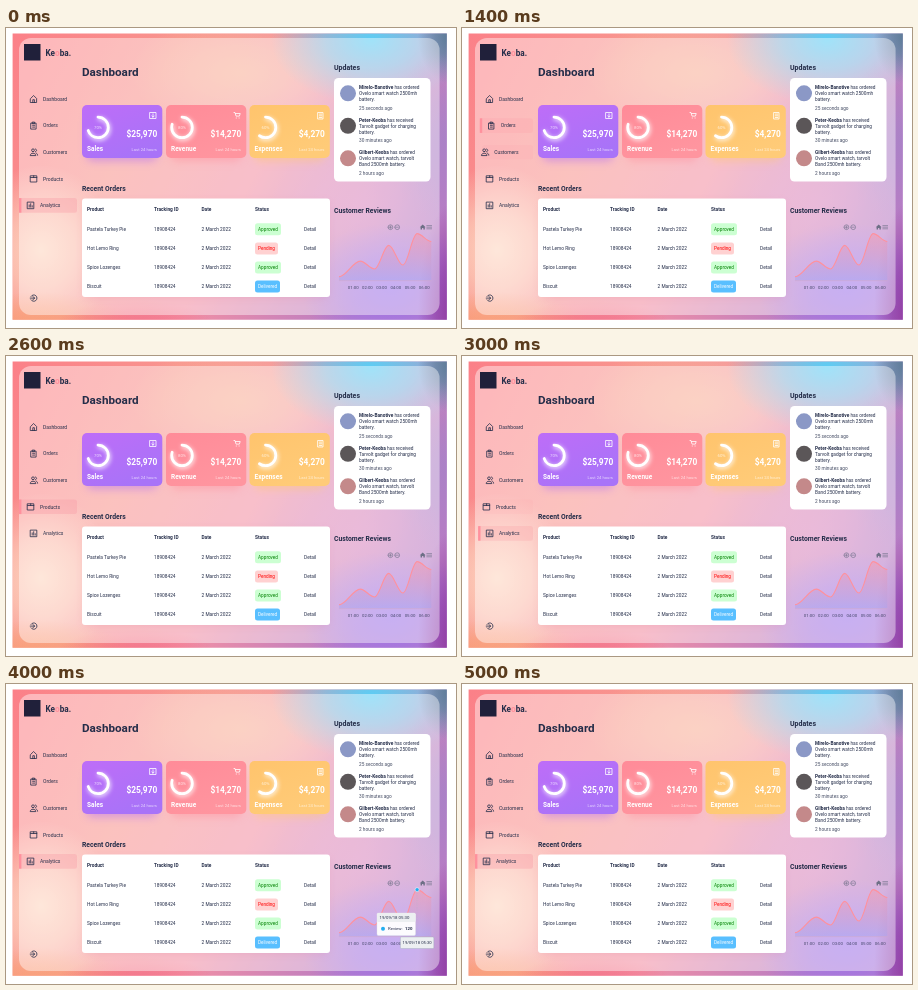
Recreate the animation shown at these times as an HTML page. Size 450x300 px, loop 5.1 s.

```html
<!DOCTYPE html>
<html lang="en">
<head>
<meta charset="utf-8">
<title>Dashboard</title>
<style>
html, body { margin: 0; width: 100%; height: 100%; overflow: hidden; background: #fff; }
svg { display: block; width: 450px; height: 300px; font-family: Roboto, sans-serif; }
text { fill: #242d49; white-space: pre; }
.b { font-weight: 700; }
.icon { fill: none; stroke: #242d49; stroke-width: .8; stroke-linecap: round; stroke-linejoin: round; }
</style>
</head>
<body>
<svg id="stage" viewBox="0 0 450 300">
  <defs>
    <clipPath id="wall"><rect x="6.6" y="5.5" width="434.2" height="286.2"/></clipPath>
    <linearGradient id="base" x2="1" y2=".35">
      <stop offset="0" stop-color="#fb8088"/><stop offset=".35" stop-color="#f8958f"/>
      <stop offset=".65" stop-color="#f290a4"/><stop offset="1" stop-color="#b87cc4"/>
    </linearGradient>
    <linearGradient id="purple" x2=".6" y2="1"><stop stop-color="#be6df8"/><stop offset="1" stop-color="#a873f8"/></linearGradient>
    <linearGradient id="rose" x2=".6" y2="1"><stop stop-color="#ff8b98"/><stop offset="1" stop-color="#ff959f"/></linearGradient>
    <linearGradient id="gold" x2=".6" y2="1"><stop stop-color="#ffc46d"/><stop offset="1" stop-color="#ffcb78"/></linearGradient>
    <linearGradient id="area" x2="0" y2="1"><stop stop-color="#ff919d" stop-opacity=".4"/><stop offset="1" stop-color="#a9a4ee" stop-opacity=".5"/></linearGradient>
    <filter id="soft" x="-30%" y="-30%" width="160%" height="180%"><feGaussianBlur stdDeviation="4"/></filter>
    <filter id="glow" x="-50%" y="-50%" width="200%" height="200%"><feDropShadow dx=".75" dy="1.5" stdDeviation="2" flood-color="#fff"/></filter>
  </defs>
  <g clip-path="url(#wall)">
    <rect x="6" y="5" width="436" height="288" fill="url(#base)"/>
    <g id="blobs"></g>
  </g>
  <rect x="13" y="10" width="420.6" height="277" rx="12" fill="#fff" fill-opacity=".42"/>
  <g id="ui"></g>
  <g id="chart"></g>
</svg>
<script>
const LOOP = 5100, STEP = 100;
const NS = "http://www.w3.org/2000/svg";
const $ = id => document.getElementById(id);
const ui = $("ui"), chart = $("chart"), defs = document.querySelector("defs");

function add(parent, tag, attrs, content) {
  const el = document.createElementNS(NS, tag);
  for (const k in attrs) el.setAttribute(k, attrs[k]);
  if (content !== undefined) el.textContent = content;
  parent.appendChild(el);
  return el;
}
const box = (p, x, y, width, height, rx, fill, more) => add(p, "rect", { x, y, width, height, rx, fill, ...more });
const label = (p, x, y, size, str, more) => add(p, "text", { x, y, "font-size": size, ...more }, str);
const bold = { class: "b" };
const clamp = v => Math.max(0, Math.min(1, v));
const ease = v => { v = clamp(v); return v * v * (3 - 2 * v); };
const mix = (a, b, k) => a + (b - a) * k;

// Colour clouds of the wall: x, y, rx, ry, colour, opacity
[
  [35, 222, 75, 85, "#fddcc4", .9],
  [235, 45, 110, 60, "#f9bd98", .7],
  [30, 298, 100, 34, "#f9a070", .8],
  [130, 298, 80, 26, "#f4607c", .6],
  [365, 12, 100, 65, "#5ccdf4", 1],
  [444, 8, 32, 48, "#4f7890", .9],
  [440, 110, 60, 85, "#a584c8", .7],
  [350, 175, 85, 70, "#e68cc0", .6],
  [385, 260, 90, 65, "#9a74f0", .85],
  [446, 285, 34, 110, "#8a2f98", .85]
].forEach(([cx, cy, rx, ry, color, alpha], i) => {
  const grad = add(defs, "radialGradient", { id: "cloud" + i });
  [[0, 1], [.45, .65], [1, 0]].forEach(([offset, k]) =>
    add(grad, "stop", { offset, "stop-color": color, "stop-opacity": alpha * k }));
  add($("blobs"), "ellipse", { cx, cy, rx, ry, fill: `url(#cloud${i})` });
});

// Brand and headings
box(ui, 18, 16, 16.5, 16.5, 0, "#20203a");
const brand = label(ui, 39.5, 28, 8.2, "", bold);
add(brand, "tspan", {}, "Ke");
add(brand, "tspan", { fill: "#ff919d" }, "o");
add(brand, "tspan", {}, "ba.");
label(ui, 76, 48.2, 11.7, "Dashboard", bold);
label(ui, 76, 162.6, 6.8, "Recent Orders", bold);
label(ui, 328, 41.5, 7, "Updates", bold);
label(ui, 328, 185.2, 6.8, "Customer Reviews", bold);

// Sidebar
const nav = [
  ["Dashboard", "M0 3 3 0 6 3V7H0ZM2.2 7V4.2H3.8V7"],
  ["Orders", "M.5 1H5.5V7H.5ZM2 0H4V1.6H2ZM2 3.2H4M2 5H4"],
  ["Customers", "M2.4 3A1.4 1.4 0 1 0 2.4 .2A1.4 1.4 0 1 0 2.4 3M-.4 6.5C-.4 3.8 5.2 3.8 5.2 6.5ZM4.7 .3C6.5 .4 6.5 2.8 4.8 3M5.4 4.4C6.6 4.7 7 5.5 7 6.5"],
  ["Products", "M0 .5H6.2V6.7H0ZM0 2.2H6.2M3.1 .5V2.2"],
  ["Analytics", "M0 .2H6.2V6.8H0ZM1.6 5.2V3M3.1 5.2V1.8M4.6 5.2V3.8"]
].map(([name, path], i) => {
  const y = 71 + 26.6 * i;
  const back = box(ui, 13, y - 7.3, 58, 14.6, 2.5, "#f799a3");
  const bar = box(ui, 13, y - 7.3, 2.4, 14.6, 0, "#ff919d");
  const row = add(ui, "g", {});
  add(row, "path", { d: path, class: "icon", transform: `translate(24.6 ${y - 3.5})` });
  label(row, 37, y + 1.8, 5, name);
  return { back, bar, row };
});
add(ui, "path", { class: "icon", d: "M25 268.4A3.2 3.2 0 1 1 25 271.8M24.2 270.1H28.6M27 268.5 28.6 270.1 27 271.7" });

// Summary cards
[
  [76, "Sales", "$25,970", 70, "purple", "#b06bf5", "M0 0H6V6H0ZM3 1.3V4.7M1.8 3.5 3 4.7 4.2 3.5"],
  [160, "Revenue", "$14,270", 80, "rose", "#ff8f9b", "M0 0H1L2 3.6H5.4L6.2 1H1.4M2.2 5.5H2.4M5 5.5H5.2"],
  [243.5, "Expenses", "$4,270", 60, "gold", "#ffc772", "M.5 0H5.5V6.5H.5ZM1.8 1.6H4.2M1.8 3.3H4.2M1.8 5H4.2"]
].forEach(([x, name, sum, pct, fill, shade, path]) => {
  box(ui, x + 5, 87, 70, 46, 5, shade, { filter: "url(#soft)", opacity: .5 });
  box(ui, x, 77, 80.3, 53, 5, `url(#${fill})`);
  const ring = add(ui, "g", { filter: "url(#glow)" });
  add(ring, "circle", {
    cx: x + 16, cy: 99.4, r: 10.3, fill: "none", stroke: "#fff", "stroke-width": 2.8, "stroke-linecap": "round",
    pathLength: 100, "stroke-dasharray": `${pct} 100`, transform: `rotate(-90 ${x + 16} 99.4)`
  });
  label(ui, x + 16, 101, 4.4, pct + "%", { style: "fill:#fff", opacity: .75, "text-anchor": "middle" });
  add(ui, "path", { d: path, class: "icon", style: "stroke:#fff", transform: `translate(${x + 68} 84.5)` });
  label(ui, x + 75.3, 108.6, 8.4, sum, { ...bold, style: "fill:#fff", "text-anchor": "end" });
  label(ui, x + 5, 123.4, 6.5, name, { ...bold, style: "fill:#fff" });
  label(ui, x + 75, 123, 4.2, "Last 24 hours", { style: "fill:#fff", opacity: .7, "text-anchor": "end" });
});

// Orders table
box(ui, 78, 174, 244, 96, 4, "#d96f8e", { filter: "url(#soft)", opacity: .2 });
box(ui, 76, 170.5, 248, 98.5, 3, "#fff");
const cols = [81, 148, 195.5, 249];
["Product", "Tracking ID", "Date", "Status"].forEach((s, i) => label(ui, cols[i], 182.7, 4.8, s, bold));
const badges = {
  Approved: [26, "#ccffd2", "#008000"],
  Pending: [23, "#ffd1d1", "#f00"],
  Delivered: [25, "#59bfff", "#fff"]
};
[["Pastela Turkey Pie", "Approved"], ["Hot Lemo Ring", "Pending"], ["Spice Lozenges", "Approved"], ["Biscuit", "Delivered"]]
  .forEach(([name, state], i) => {
    const y = 203 + 19.1 * i;
    [name, "18908424", "2 March 2022"].forEach((s, c) => label(ui, cols[c], y, 4.8, s));
    const [w, bg, ink] = badges[state];
    box(ui, 249, y - 7.7, w, 12, 2.5, bg);
    label(ui, 249 + w / 2, y, 4.7, state, { "text-anchor": "middle", style: "fill:" + ink });
    label(ui, 298, y, 4.8, "Detail");
  });

// Updates
box(ui, 328, 50, 96.5, 103.5, 4.5, "#fff");
[
  ["Mirelo-Banotive", " has ordered", "Ovelo smart watch 2500mh", "battery.", "25 seconds ago", "#8b98c6"],
  ["Peter-Keoba", " has received", "Tarvolt gadget for charging", "battery.", "30 minutes ago", "#5b5658"],
  ["Gilbert-Keoba", " has ordered", "Ovelo smart watch, tarvolt", "Band 2500mh battery.", "2 hours ago", "#c4898a"]
].forEach(([who, did, l1, l2, when, color], i) => {
  const y = 61 + 32.5 * i;
  add(ui, "circle", { cx: 342, cy: y + 4.3, r: 8, fill: color });
  const first = label(ui, 353, y, 4.75, "");
  add(first, "tspan", bold, who);
  add(first, "tspan", {}, did);
  label(ui, 353, y + 6, 4.75, l1);
  label(ui, 353, y + 12, 4.75, l2);
  label(ui, 353, y + 20.8, 4.75, when, { opacity: .85 });
});

// Review chart
const hours = [0, 1.5, 2.5, 3.5, 4.5, 5.5, 6.5];
const scores = [10, 50, 30, 90, 40, 120, 100];
const px = h => 333 + h * 14.2;
const py = v => 252.7 - v * .392;
let line = `M${px(0)} ${py(scores[0])}`;
for (let i = 1; i < hours.length; i++) {
  const a = px(hours[i - 1]), b = px(hours[i]), d = (b - a) * .35;
  line += `C${a + d} ${py(scores[i - 1])} ${b - d} ${py(scores[i])} ${b} ${py(scores[i])}`;
}
add(chart, "path", { d: `${line}V252.7H333Z`, fill: "url(#area)" });
add(chart, "path", { d: line, fill: "none", stroke: "#ff919d", "stroke-width": 1.1 });
add(chart, "path", { d: "M333 252.7H425.5", stroke: "#e0a9bd", "stroke-width": .4 });
for (let h = 1; h <= 6; h++) label(chart, px(h), 260.6, 4.3, `0${h}:00`, { "text-anchor": "middle", opacity: .8 });
const tools = { class: "icon", style: "stroke:#6d6f86;stroke-width:.6" };
add(chart, "path", { ...tools, d: "M382 199.2a2.4 2.4 0 1 0 4.8 0a2.4 2.4 0 1 0-4.8 0M383.2 199.2H385.6M384.4 198V200.4M388.8 199.2a2.4 2.4 0 1 0 4.8 0a2.4 2.4 0 1 0-4.8 0M390 199.2H392.4M420.8 197.6H425.6M420.8 199.2H425.6M420.8 200.8H425.6" });
add(chart, "path", { d: "M413.8 199.2 416.7 196.6 419.6 199.2H418.8V201.6H417.4V200H416V201.6H414.6V199.2Z", fill: "#6d6f86" });

// Tooltip
const tip = add(chart, "g", {});
const guide = add(tip, "path", { d: "M0 204V252.5", stroke: "#b6b6cc", "stroke-width": .4, "stroke-dasharray": "1.2 1.2" });
const dot = add(tip, "circle", { r: 2, fill: "#22aef0", stroke: "#fff", "stroke-width": .5 });
const card = add(tip, "g", {});
box(card, 0, 0, 38.5, 22.5, 1.5, "#fff", { "fill-opacity": .95, stroke: "#e3e3e3", "stroke-width": .4 });
box(card, 0, 0, 38.5, 9, 1.5, "#eceff1");
const when = label(card, 2.5, 6.4, 4.3, "");
add(card, "circle", { cx: 6, cy: 15.8, r: 2, fill: "#22aef0" });
label(card, 11, 17.4, 4.3, "Review:");
const score = label(card, 28, 17.4, 4.3, "", bold);
const flag = add(tip, "g", {});
box(flag, -16.7, 253, 33.4, 11.5, 1, "#eceff1", { stroke: "#90a4ae", "stroke-width": .35 });
const flagText = label(flag, 0, 260.4, 4.2, "", { "text-anchor": "middle" });

// Clicked sidebar items: time in ms, index
const clicks = [[-LOOP, 4], [430, 2], [1230, 1], [2080, 3], [2800, 4]];
const SLIDE = 300;

function drawNav(t) {
  const now = clicks.filter(c => c[0] <= t).length - 1;
  const k = ease((t - clicks[now][0]) / SLIDE);
  const active = clicks[now][1];
  const last = now ? clicks[now - 1][1] : active;
  nav.forEach(({ back, bar, row }, i) => {
    const on = i === active ? k : i === last ? 1 - k : 0;
    const inset = 12 * (1 - on);
    back.setAttribute("x", 13 + inset);
    back.setAttribute("width", 58 - inset);
    back.setAttribute("opacity", .36 * on);
    bar.setAttribute("x", 13 + inset);
    bar.setAttribute("opacity", i === active ? 1 : 0);
    // the bar pushes the row aside while the margin closes
    row.setAttribute("transform", `translate(${i === active ? inset - 3 : inset - 12} 0)`);
  });
}

function drawTip(t) {
  tip.setAttribute("opacity", Math.min(ease((t - 3420) / 180), 1 - ease((t - 4700) / 180)));
  const n = t < 3620 ? 3 : t < 3780 ? 4 : 5;
  const x = px(hours[n]);
  const move = ease((t - 3600) / 320);
  guide.setAttribute("transform", `translate(${x} 0)`);
  dot.setAttribute("cx", x);
  dot.setAttribute("cy", py(scores[n]));
  card.setAttribute("transform", `translate(${mix(349, 371, move)} ${mix(201.5, 229, move)})`);
  flag.setAttribute("transform", `translate(${mix(px(3.5), px(5.5), move)} 0)`);
  when.textContent = flagText.textContent = `19/09/18 0${Math.floor(hours[n])}:30`;
  score.textContent = scores[n];
}

const start = performance.now();
function tick() {
  const t = Math.floor((performance.now() - start) % LOOP / STEP) * STEP;
  drawNav(t);
  drawTip(t);
  requestAnimationFrame(tick);
}
tick();
</script>
</body>
</html>
```
